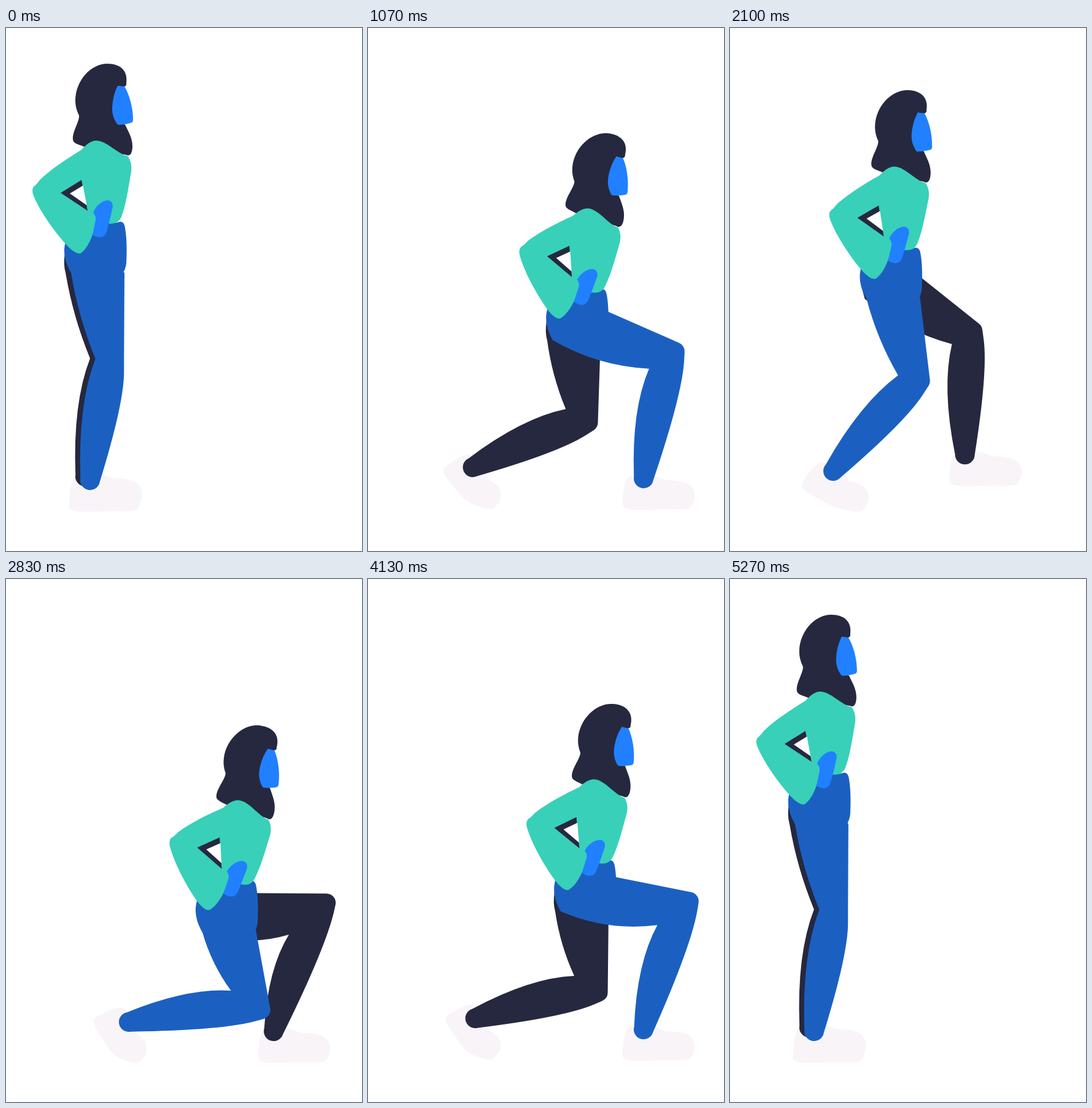
An HTML page with a canvas that plays this animation: 580 px wide and 850 px high, repeating every 5310 ms.

```html
<!DOCTYPE html>
<html>
<head>
<meta charset="utf-8">
<title>Lunges</title>
<style>
  html, body { margin: 0; width: 100%; height: 100%; overflow: hidden; background: #fff; }
  canvas { display: block; }
</style>
</head>
<body>
<canvas id="stage" width="580" height="850"></canvas>
<script>
const ctx = document.getElementById('stage').getContext('2d');
const LUNGE = 1770, LOOP = 3 * LUNGE;
const INK = '#26283f', GREEN = '#38d0b9', PANTS = '#1b60c1', SKIN = '#2180ff', SHOE = '#f8f4f8';

const hair = new Path2D('M196 90C199 70 187 58 165 58C138 58 113 86 113 118C113 128 116 136 119 142C120 152 108 168 109 181C109 188 118 189 130 194L195 206C203 210 206 202 206 192C206 178 199 168 194 157L181 150L182 94L187 95C192 96 197 95 196 90Z');
const face = new Path2D('M182 94C176 105 173 120 173 132C173 143 178 152 182 157C187 158 197 156 204 154Q207 153 207 149C207 130 201 108 193 95Z');
const shirt = new Path2D('M123 198C130 190 138 183 147 183C164 183 182 205 198 208C204 216 205 224 204 233C200 256 196 285 189 304C186 314 180 318 170 318L146 318C141 340 133 358 122 366C117 368 108 363 98 352C78 330 55 297 45 273C43 268 42 262 45 258C50 254 52 251 55 247C75 228 100 212 123 198Z');
const farArm = new Path2D('M89 268L123 247L133 297Z');
const gap = new Path2D('M104 269L125.5 256L131.5 288Z');
const hand = new Path2D('M142 300C146 290 156 280 166 280Q174 281 174 290C171 305 167 320 164 331Q161 340 152 340Q145 339 141 336L146 312Q147 306 142 300Z');
const pelvis = new Path2D('M165 318L182 316Q192 311 194 325C197 342 197 365 196 382Q195 392 190 399L106 398C98 385 95 372 95 362C95 352 98 345 100 335L140 310Z');
const shoe = [[-33, 51], [-35, 35], [-30, 3], [-22, -6], [18, -5], [33, 3], [50, 3], [68, 6],
  [80, 14], [85, 29], [80, 42], [74, 51], [36, 50], [10, 51]];

// time, body x, body y, lean in degrees
const fall = [[0, 0, 0, 0], [130, 20, 2, .2], [210, 50, 9, .5], [330, 116, 42, 1.8],
  [430, 165, 73, 3.2], [590, 208, 142, 5.7], [850, 215, 176, 7.5]];
const blueKeys = [...fall, [960, 211, 156, 7.4], [1070, 195.5, 110, 6.7], [1230, 122, 48, 4],
  [1390, 42, 9, 1.3], [1560, 6, 1, .2], [1770, 0, 0, 0]];
const darkKeys = [...fall, [1060, 214, 176, 7.5], [1160, 198, 145, 6.9], [1300, 116, 68, 4],
  [1420, 38, 16, 1.5], [1530, 8, 2, .3], [1770, 0, 0, 0]];

const rad = d => d * Math.PI / 180;
const smooth = s => { s = Math.min(1, Math.max(0, s)); return s * s * (3 - 2 * s); };
const add = (p, d, k) => [p[0] + d[0] * k, p[1] + d[1] * k];
const sub = (p, q) => [p[0] - q[0], p[1] - q[1]];
const mix = (p, q, k) => add(p, sub(q, p), k);
const unit = p => { const l = Math.hypot(...p); return [p[0] / l, p[1] / l]; };
const front = d => [d[1], -d[0]];
const turn = ([x, y], a) => [x * Math.cos(a) - y * Math.sin(a), x * Math.sin(a) + y * Math.cos(a)];

// Smooth curve through the keys
function sample(keys, t) {
  let i = 0;
  while (i < keys.length - 2 && keys[i + 1][0] <= t) i++;
  const at = n => keys[Math.min(keys.length - 1, Math.max(0, n))];
  const h = at(i + 1)[0] - at(i)[0], s = (t - at(i)[0]) / h;
  const slope = (n, c) => n <= 0 || n >= keys.length - 1 ? 0 :
    (at(n + 1)[c] - at(n - 1)[c]) / (at(n + 1)[0] - at(n - 1)[0]);
  return [1, 2, 3].map(c => {
    const k = smooth(s), a = at(i)[c], b = at(i + 1)[c];
    return a + (b - a) * k + h * s * (1 - s) * (slope(i, c) * (1 - s) - slope(i + 1, c) * s);
  });
}

function fill(path, color) {
  ctx.fillStyle = color;
  ctx.fill(path);
}

// The sole bends at the ball of the foot when the heel lifts
function drawShoe(ankle, angle, shift) {
  const ball = [35, 50], a = rad(angle);
  const pts = shoe.map(p => {
    if (p[0] > 35) p = add(ball, turn(sub(p, ball), -.7 * a), 1);
    return add(add(ankle, turn(p, a), 1), [shift, 0], 1);
  });
  const n = pts.length;
  ctx.beginPath();
  ctx.moveTo(...mix(pts[n - 1], pts[0], .5));
  pts.forEach((p, i) => ctx.quadraticCurveTo(...p, ...mix(p, pts[(i + 1) % n], .5)));
  ctx.fillStyle = SHOE;
  ctx.fill();
}

function drawLeg(body, ankle, off, thigh, shin, color) {
  const at = (x, y) => [x + body[0], y + body[1]];
  const hip = at(148 + off, 392);
  const line = sub(ankle, hip), d = Math.hypot(...line), dir = unit(line);
  const along = (thigh * thigh - shin * shin + d * d) / (2 * d);
  const bend = Math.max(26, Math.sqrt(Math.max(0, thigh * thigh - along * along)));
  const knee = add(add(hip, dir, along), front(dir), bend);

  const u = unit(sub(knee, hip)), v = unit(sub(ankle, knee));
  const out = unit(sub(u, v));
  const fold = Math.sqrt((1 + u[0] * v[0] + u[1] * v[1]) / 2);
  const inner = add(knee, out, -23.5 / fold), cap = add(knee, out, 22.5 / fold ** 1.6);
  const deg = Math.atan2(u[1], u[0]) * 180 / Math.PI;
  const slide = off * Math.max(0, deg) / 82;
  const seat = at(106 + slide, 398);
  const lap = at(193 + slide, Math.min(398, 340 + .73 * deg));
  const n = front(v), phi = Math.atan2(v[1], v[0]);
  const heel = add(ankle, n, -16), shank = add(ankle, n, 16);
  const ham = add(mix(seat, inner, .5), front(unit(sub(inner, seat))), -(22 - .17 * deg));
  const calf = add(mix(inner, heel, .4), n, -19);
  const crest = add(mix(cap, shank, .35), n, 14);

  ctx.beginPath();
  ctx.moveTo(...at(150, 350));
  ctx.lineTo(...at(96, 365));
  ctx.quadraticCurveTo(...at(102 + slide, 385), ...seat);
  ctx.quadraticCurveTo(...ham, ...inner);
  ctx.quadraticCurveTo(...calf, ...heel);
  ctx.arc(...ankle, 16, phi + Math.PI / 2, phi - Math.PI / 2, true);
  ctx.quadraticCurveTo(...crest, ...mix(cap, crest, .3));
  ctx.arcTo(...cap, ...lap, 15);
  ctx.lineTo(...lap);
  ctx.closePath();
  ctx.fillStyle = color;
  ctx.fill();
}

function draw(now) {
  const time = now % LOOP, t = time % LUNGE;
  const darkLeads = Math.floor(time / LUNGE) === 1;
  const [x, y, lean] = sample(darkLeads ? darkKeys : blueKeys, t);
  const body = [x, y], drop = Math.max(0, y);

  // Leading foot steps out and back; the other rolls onto its toes
  const step = smooth((t - 15) / 430) * (1 - smooth((t - (darkLeads ? 1180 : 1150)) / 430));
  const lift = 70 * Math.sin(Math.PI * step ** 1.15);
  const roll = 64 * (1 - Math.exp(-drop / 70));
  const rise = -15 * (1 - Math.exp(-drop / 6));
  const blueFoot = darkLeads ? [137 + 1.07 * roll, 735 + rise] : [137 + 312 * step, 735 - 3 * step - lift];
  const darkFoot = darkLeads ? [129 + 307 * step, 729 + 6 * step - lift] : [129 + .82 * roll, 729 + rise];
  const backThigh = 146 - .12 * y;

  ctx.fillStyle = '#fff';
  ctx.fillRect(0, 0, 580, 850);
  drawShoe(darkFoot, darkLeads ? 0 : roll, 9);
  drawShoe(blueFoot, darkLeads ? roll : 0, 0);
  drawLeg(body, darkFoot, -9, darkLeads ? 146 - .02 * y : backThigh, 194, INK);
  drawLeg(body, blueFoot, 0, darkLeads ? backThigh : 146, 199, PANTS);

  ctx.save();
  ctx.translate(x, y);
  fill(pelvis, PANTS);
  ctx.translate(150, 330);
  ctx.rotate(rad(lean));
  ctx.translate(-150, -330);
  fill(hair, INK);
  fill(face, SKIN);
  fill(shirt, GREEN);
  fill(farArm, INK);
  fill(gap, '#fff');
  fill(hand, SKIN);
  ctx.restore();
}

function frame() {
  draw(performance.now());
  requestAnimationFrame(frame);
}
frame();
</script>
</body>
</html>
```
